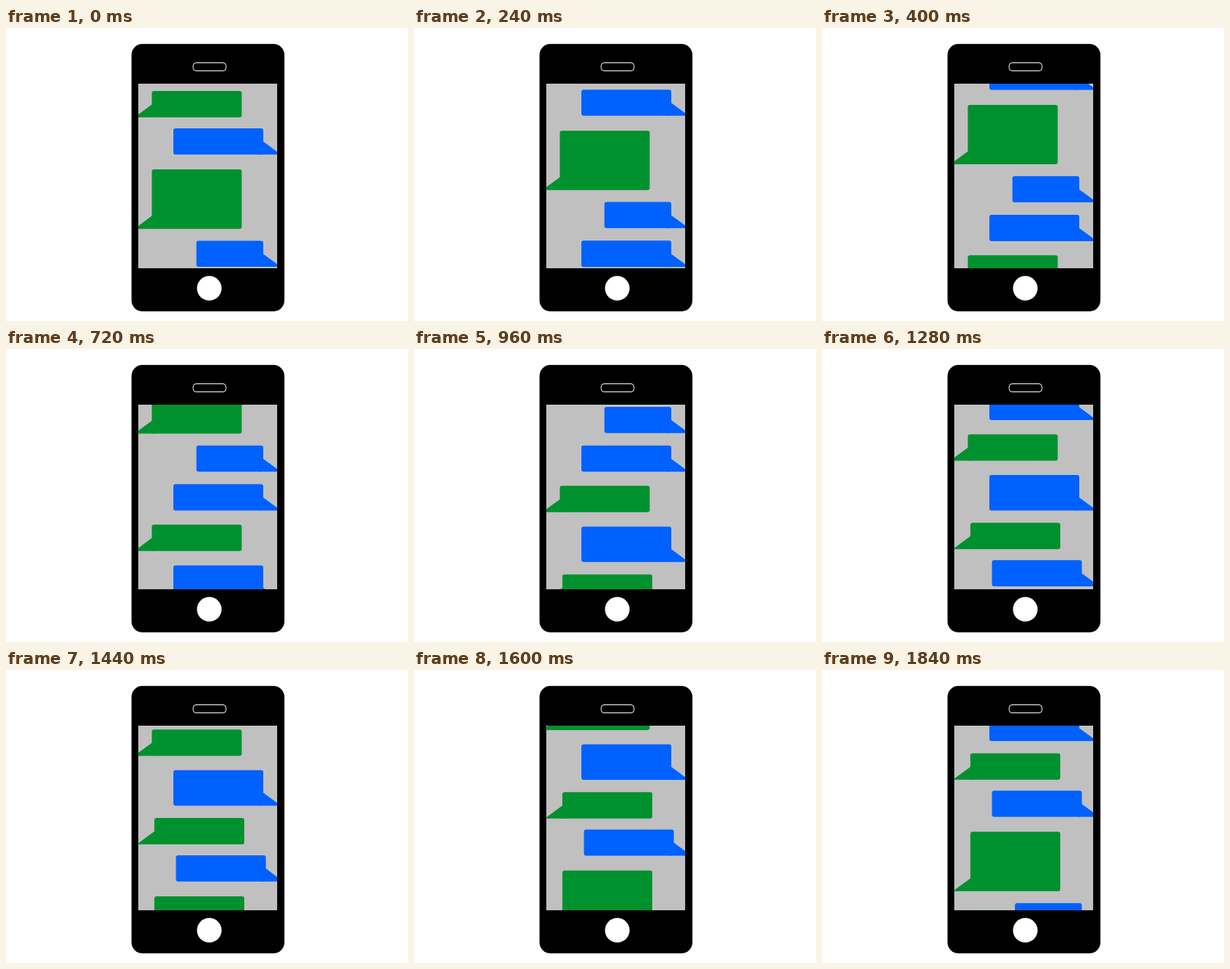
Write an HTML page with a canvas that moves like this. It is 550 px wide and 400 px high and loops after 1.92 s.

```html
<!DOCTYPE html>
<html lang="en">
<head>
<meta charset="utf-8">
<title>Message scroll</title>
<style>
html, body { margin: 0; width: 100%; height: 100%; overflow: hidden; background: #fff; }
canvas { display: block; }
</style>
</head>
<body>
<canvas id="stage" width="550" height="400"></canvas>
<script>
const ctx = document.getElementById('stage').getContext('2d');
const LOOP = 1920, STEP = 80, SPEED = 17.62;
const GREEN = '#00912f', BLUE = '#0061ff';

// The first four bubbles return at the end, lower and a little to the right.
const opening = [
  [GREEN, 199.5, 86, 123, 36],
  [BLUE, 229, 137, 123, 35.7],
  [GREEN, 199.5, 193, 123, 81.2],
  [BLUE, 260.5, 290.4, 91.5, 35.7]
];
const bubbles = [
  ...opening,
  [BLUE, 229, 343.1, 123, 35.9],
  [GREEN, 199.5, 398.3, 123, 36],
  [BLUE, 229, 454, 123, 48.3],
  ...opening.map(([c, x, y, w, h]) => [c, x + 3.5, y + 433.1, w, h])
];

function roundRect(x, y, w, h, r) {
  ctx.beginPath();
  ctx.roundRect(x, y, w, h, r);
}

function drawBubble([color, x, y, w, h]) {
  const left = color === GREEN;
  const edge = left ? x : x + w;
  const dir = left ? -1 : 1;
  ctx.fillStyle = color;
  roundRect(x, y, w, h, 3);
  ctx.fill();
  ctx.beginPath();
  ctx.moveTo(edge - dir * 5, y + h - 17.6);
  ctx.lineTo(edge, y + h - 17.6);
  ctx.lineTo(edge + dir * 24, y + h);
  ctx.lineTo(edge - dir * 5, y + h);
  ctx.fill();
}

function drawPhone() {
  ctx.fillStyle = '#fff';
  ctx.fillRect(0, 0, 550, 400);
  ctx.fillStyle = '#000';
  roundRect(171.7, 21.8, 209.2, 365, 15);
  ctx.fill();
  ctx.strokeStyle = '#fff';
  ctx.lineWidth = 1;
  roundRect(256, 47.5, 45, 11, 4);
  ctx.stroke();
  ctx.fillStyle = '#fff';
  ctx.beginPath();
  ctx.arc(278.1, 355.3, 16.8, 0, Math.PI * 2);
  ctx.fill();
}

function draw(ms) {
  const scroll = Math.floor((ms % LOOP) / STEP) * SPEED;
  drawPhone();
  ctx.save();
  ctx.beginPath();
  ctx.rect(181, 76, 190, 252);
  ctx.clip();
  ctx.fillStyle = '#c0c0c0';
  ctx.fillRect(181, 76, 190, 252);
  ctx.translate(0, -scroll);
  bubbles.forEach(drawBubble);
  ctx.restore();
}

let start;
function tick(now) {
  start ??= now;
  draw(now - start);
  requestAnimationFrame(tick);
}
draw(0);
requestAnimationFrame(tick);
</script>
</body>
</html>
```
